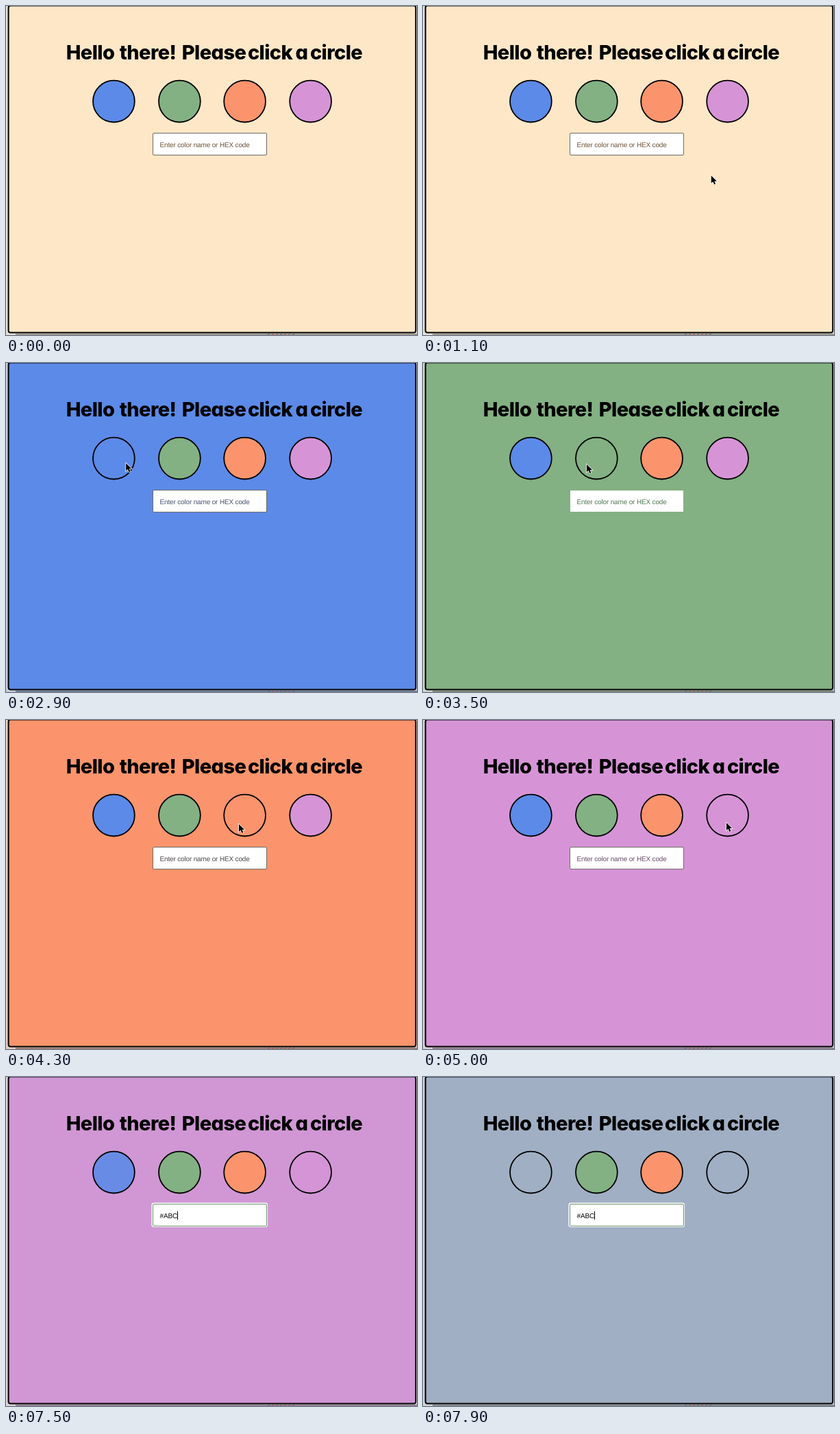
An HTML page with a canvas for the animation above (8 s loop, 600x480 px).

```html
<!DOCTYPE html>
<html lang="en">
<head>
<meta charset="utf-8">
<title>Pick a colour</title>
<style>
  html, body { margin: 0; width: 100%; height: 100%; overflow: hidden; }
  canvas { display: block; position: absolute; left: 0; top: 0; }
  h1 {
    position: absolute; left: 0; top: 49.5px; margin: 0;
    font: 800 29px/35px Inter, Lato, sans-serif;
    font-feature-settings: "cv11";
    letter-spacing: -0.6px; white-space: nowrap; color: #000;
  }
  h1 span { position: absolute; transform: translateX(-50%); }
</style>
</head>
<body>
<canvas id="stage" width="600" height="480"></canvas>
<h1>
  <span style="left:123px">Hello</span>
  <span style="left:207px">there!</span>
  <span style="left:303.5px">Please</span>
  <span style="left:385.5px">click</span>
  <span style="left:431.5px">a</span>
  <span style="left:482px">circle</span>
</h1>
<script>
const ctx = document.getElementById('stage').getContext('2d');
const LOOP = 8000, STEP = 100;
const FONT = '10px "Liberation Sans", Arial, sans-serif';

const CREAM = [254, 231, 199], BLUE = [92, 138, 232], GREEN = [131, 177, 131],
      ORANGE = [251, 148, 108], PLUM = [214, 148, 214], SLATE = [160, 175, 196],
      PAPER = [222, 222, 218];

const CIRCLES = [[157.4, BLUE], [253.4, GREEN], [348.6, ORANGE], [444.6, PLUM]];

// Background fades: start, colour, placeholder colour
const FADES = [
  [2650, BLUE, [70, 82, 115]],
  [3250, GREEN, [80, 120, 80]],
  [4050, ORANGE, [76, 72, 70]],
  [4750, PLUM, [105, 75, 105]],
  [7450, SLATE, [90, 90, 90]]
];
const FADE_MS = 250;

// Pointer stops: time, x, y
const PATH = [
  [100, 600, 330], [900, 470, 260], [1500, 280, 212], [1700, 280, 212],
  [2200, 166, 146], [2800, 166, 146], [3250, 239, 148], [3500, 239, 148],
  [4050, 340, 152], [4300, 340, 152], [4800, 443, 150], [5200, 443, 150],
  [5900, 300, 203], [6400, 300, 203]
];
const FOCUS = 6100;
const KEYS = [[6400, '#'], [6800, 'A'], [7000, 'B'], [7200, 'C']];

const clamp = v => Math.max(0, Math.min(1, v));
const ease = v => v * v * (3 - 2 * v);
const mix = (a, b, k) => a.map((v, i) => v + (b[i] - v) * k);
const css = c => `rgb(${c.map(Math.round).join(',')})`;

function box(x, y, w, h, r, fill, stroke, line = 1) {
  ctx.beginPath();
  ctx.roundRect(x, y, w, h, r);
  if (fill) { ctx.fillStyle = fill; ctx.fill(); }
  if (stroke) { ctx.strokeStyle = stroke; ctx.lineWidth = line; ctx.stroke(); }
}

function colours(t) {
  let bg = CREAM, hint = [110, 82, 54];
  for (const [start, colour, ink] of FADES) {
    const k = ease(clamp((t - start) / FADE_MS));
    bg = mix(bg, colour, k);
    hint = mix(hint, ink, k);
  }
  return { bg, hint };
}

function pointerAt(t) {
  const i = PATH.findIndex(p => p[0] > t);
  if (i < 1) return null;
  const [t0, ...a] = PATH[i - 1], [t1, ...b] = PATH[i];
  return mix(a, b, ease((t - t0) / (t1 - t0)));
}

function drawFrame(bg) {
  ctx.fillStyle = css(mix(PAPER, bg, 0.2));
  ctx.fillRect(0, 0, 600, 480);
  ctx.fillStyle = css(mix(bg, [120, 120, 120], 0.7));
  ctx.fillRect(14, 478, 586, 2);
  ctx.lineWidth = 1;
  for (let i = 0; i < 7; i++) {
    ctx.strokeStyle = i % 3 ? '#a0483c' : '#4a5a8c';
    ctx.beginPath();
    ctx.moveTo(382 + i * 6, 480);
    ctx.lineTo(385 + i * 6, 478);
    ctx.stroke();
  }
  box(3.6, -0.5, 594.6, 477, 3, css(bg), '#000', 2);
}

function drawCircles(t, bg) {
  const fade = ease(clamp((t - 7450) / FADE_MS));
  ctx.strokeStyle = '#000';
  ctx.lineWidth = 1.8;
  for (const [x, colour] of CIRCLES) {
    const fades = colour === BLUE || colour === PLUM;
    ctx.beginPath();
    ctx.arc(x, 139.1, 30.4, 0, Math.PI * 2);
    ctx.fillStyle = css(fades ? mix(colour, bg, fade) : colour);
    ctx.fill();
    ctx.stroke();
  }
}

function drawInput(t, hint) {
  const focused = t >= FOCUS;
  const bare = t >= 3300 && t < 3700;
  if (focused) box(212.5, 183.5, 169.5, 35.5, 3, '#fff');
  if (bare) box(215, 186, 165, 31, 0, '#fff');
  else box(214.5, 185.5, 166, 32, 1.5, '#fff', focused ? '#6c956c' : '#706a64');

  const typed = KEYS.filter(k => t >= k[0]).map(k => k[1]).join('');
  ctx.font = FONT;
  ctx.letterSpacing = '-0.16px';
  ctx.textRendering = 'geometricPrecision';
  ctx.fillStyle = typed ? '#000' : css(hint);
  ctx.fillText(typed || 'Enter color name or HEX code', 224.5, 206);
  if (focused) {
    ctx.fillStyle = '#000';
    ctx.fillRect(Math.round(225 + ctx.measureText(typed).width), 196, 1, 12);
  }
}

function drawPointer(t) {
  const p = pointerAt(t);
  if (!p) return;
  const [x, y] = p;
  const overInput = x > 214 && x < 381 && y > 185 && y < 218;
  ctx.save();
  ctx.translate(x, y);
  ctx.beginPath();
  if (overInput) {
    ctx.moveTo(-2, -6); ctx.lineTo(0, -5); ctx.lineTo(2, -6);
    ctx.moveTo(0, -5); ctx.lineTo(0, 5);
    ctx.moveTo(-2, 6); ctx.lineTo(0, 5); ctx.lineTo(2, 6);
    ctx.strokeStyle = '#000';
    ctx.lineWidth = 1;
    ctx.stroke();
  } else {
    ctx.scale(0.92, 0.92);
    [[0, 0], [0, 12], [2.8, 9.5], [4.8, 14], [6.9, 13], [5, 8.8], [8.8, 8.7]]
      .forEach(q => ctx.lineTo(...q));
    ctx.closePath();
    ctx.strokeStyle = '#fff';
    ctx.lineWidth = 1.6;
    ctx.stroke();
    ctx.fillStyle = '#000';
    ctx.fill();
  }
  ctx.restore();
}

function render(t) {
  const { bg, hint } = colours(t);
  drawFrame(bg);
  drawCircles(t, bg);
  drawInput(t, hint);
  drawPointer(t);
}

const began = performance.now();
function tick() {
  const t = (performance.now() - began) % LOOP;
  render(Math.floor(t / STEP) * STEP);
  requestAnimationFrame(tick);
}
tick();
</script>
</body>
</html>
```
